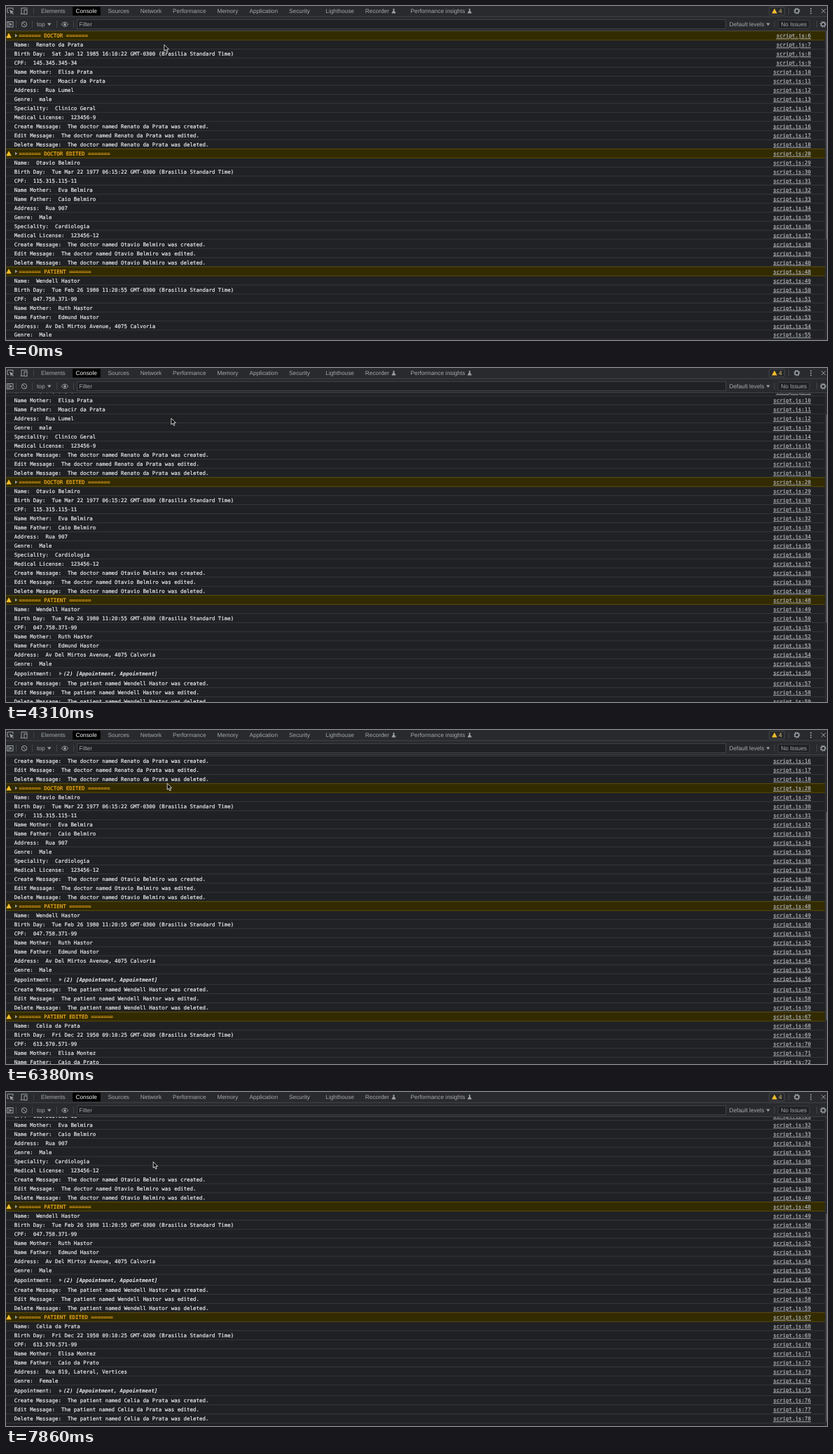
Write an HTML page that moves like this. It is 1172 px wide and 478 px high and loops after 8 s.

```html
<!DOCTYPE html>
<html lang="en">
<head>
<meta charset="utf-8">
<title>Console log</title>
<style>
  html, body { margin: 0; width: 100%; height: 100%; overflow: hidden; background: #202124; }
  svg { display: block; width: 100%; height: 100%; }
  text { white-space: pre; text-rendering: geometricPrecision; }
  #log text { font: 7.44px "DejaVu Sans Mono", monospace; fill: #eceef1; stroke: #eceef1; stroke-width: .18; }
  #log .warn { fill: #fdb322; stroke: #fdb322; }
  #log .link { fill: #b4b8bd; stroke: #b4b8bd; text-anchor: end; text-decoration: underline; }
  #log .list { font-weight: bold; font-style: italic; stroke: none; }
  .bar text { font: 8.3px "Liberation Sans", Arial, sans-serif; fill: #a4a9ae; }
  .bar .on { fill: #f1f3f4; }
  .sep { stroke: #4a4c50; stroke-width: .8; }
  .icon { fill: none; stroke: #9aa0a6; stroke-width: 1; }
  .solid { fill: #9aa0a6; }
</style>
</head>
<body>
<svg viewBox="0 0 1172 478" xmlns="http://www.w3.org/2000/svg">
  <defs>
    <clipPath id="view"><rect y="35.6" width="1172" height="442.4"/></clipPath>
    <path id="flask" d="M-1.3-3.2h2.6v.8h-.5V-.6L2.9 2.5Q3.1 3.3 2.3 3.3h-4.6q-.8 0-.6-.8L-.8-.6v-1.8h-.5z" fill="#9aa0a6"/>
    <path id="alert" d="M0-3.3 3.4 3H-3.4z" fill="#f7c02c" stroke="#f7c02c" stroke-width=".5" stroke-linejoin="round"/>
    <g id="gear" class="icon">
      <circle r="2.7" stroke-width="1.3"/>
      <circle r="3.9" stroke-width="1.3" stroke-dasharray="1.5 1.563"/>
    </g>
  </defs>

  <rect width="1172" height="478" fill="#202124"/>
  <g clip-path="url(#view)">
    <g id="log"></g>
    <rect x="1169" y="35" width="3" height="443" fill="#2a2b2e"/>
    <rect id="thumb" x="1170.5" y="36" width="2" height="298" fill="#56585c"/>
  </g>

  <g class="bar">
    <rect width="1172" height="35.6" fill="#292a2d"/>
    <rect x="95.2" y="1.2" width="39.6" height="12.4" fill="#000"/>
    <path class="sep" d="M0 15.2H1172M0 35.4H1172M39.5 3V12M1117.5 3V12M14.5 21V31M37.5 21V31M72.5 21V31M96.5 21V31M1097 21V31M1157.5 21V31"/>
    <g id="tabs"></g>

    <path class="icon" d="M4 9.5H2V3H10V6"/>
    <path class="solid" d="M5 5.5 11.2 8 8.8 8.9 11 11.2 10.1 12 8 9.8 7 12z"/>
    <path class="icon" d="M22 11V3H30V4.5M20.5 11.3H25"/>
    <rect class="icon" x="26" y="5.5" width="4" height="6.2"/>
    <use href="#flask" x="553.5" y="7.2"/>
    <use href="#flask" x="661.8" y="7.2"/>

    <rect x="1089.5" y="1.6" width="22" height="11.4" rx="1.5" fill="none" stroke="#4a4c50" stroke-width=".8"/>
    <use href="#alert" x="1097" y="7.3"/>
    <text x="1103" y="10.2" style="fill:#e3c36c">4</text>
    <use href="#gear" x="1129" y="7.2"/>
    <g class="solid"><circle cx="1149" cy="3.9" r="1"/><circle cx="1149" cy="7.2" r="1"/><circle cx="1149" cy="10.5" r="1"/></g>
    <path class="icon" d="M1164 4.2 1170 10.2M1170 4.2 1164 10.2"/>

    <rect class="icon" x="1.5" y="22.5" width="8.5" height="7.5"/>
    <path class="icon" d="M4 22.5V30"/>
    <path class="solid" d="M5.5 24 8.8 26.2 5.5 28.4z"/>
    <circle class="icon" cx="26" cy="26.2" r="3.7"/>
    <path class="icon" d="M23.4 23.6 28.6 28.8"/>
    <text x="44" y="29.1">top</text>
    <path class="solid" d="M59 24.6H64.6L61.8 28.2z"/>
    <path class="icon" d="M79.2 26.2Q84 20 88.8 26.2Q84 32.4 79.2 26.2z"/>
    <circle class="solid" cx="84" cy="26.2" r="1.7"/>
    <rect x="101.4" y="19.4" width="926" height="13.2" fill="#202124" stroke="#46494d" stroke-width=".8"/>
    <text x="104.5" y="29.1">Filter</text>
    <text x="1032.5" y="29.1">Default levels</text>
    <path class="solid" d="M1085.3 24.6H1090.5L1087.9 28.2z"/>
    <rect x="1102" y="20.3" width="45" height="11.8" rx="1.5" fill="#202124" stroke="#46494d" stroke-width=".8"/>
    <text x="1106.3" y="29.1">No Issues</text>
    <use href="#gear" x="1166.5" y="26.2"/>
  </g>

  <path id="cursor" d="M0 0V8.8L2 7 3.5 10.4 5 9.7 3.6 6.5H6.4z" fill="#000" stroke="#fff" stroke-width=".8" stroke-linejoin="round"/>
</svg>

<script>
const LOOP = 8000, STEP = 148;
const $ = id => document.getElementById(id);

function add(parent, tag, attrs, content) {
  const el = document.createElementNS("http://www.w3.org/2000/svg", tag);
  for (const name in attrs) el.setAttribute(name, attrs[name]);
  if (content) el.textContent = content;
  parent.appendChild(el);
}

const tabs = {
  Elements: 50, Console: 99.5, Sources: 145.5, Network: 191.8, Performance: 238,
  Memory: 301.5, Application: 347.5, Security: 404, Lighthouse: 456.3,
  Recorder: 512.8, "Performance insights": 577.5
};
for (const name in tabs)
  add($("tabs"), "text", { x: tabs[name], y: 10.1, class: name === "Console" ? "on" : "" }, name);

const log = $("log");
const heights = { warn: 13, field: 12.93, message: 13.12, list: 15.4 };
let rowTop = 35.8;

function row(kind, text, line) {
  const h = heights[kind], base = rowTop + 9.6;
  if (kind === "warn") {
    add(log, "rect", { y: rowTop, width: 1169, height: h, fill: "#332b00" });
    add(log, "path", { d: `M0 ${rowTop}H1169M0 ${rowTop + h}H1169`, stroke: "#665508", "stroke-width": .8 });
    add(log, "use", { href: "#alert", x: 4, y: rowTop + 6.6 });
    add(log, "path", { d: `M13 ${rowTop + 4.3}l3.4 2.3-3.4 2.3z`, fill: "#9aa0a6" });
    add(log, "text", { x: 18.5, y: base, class: "warn" }, text);
  } else {
    add(log, "path", { d: `M0 ${rowTop + h}H1169`, stroke: "#3b3d41", "stroke-width": .8 });
    if (kind === "list") {
      add(log, "text", { x: 11.8, y: base + 1.4 }, "Appointment:");
      add(log, "path", { d: `M76.2 ${rowTop + 5.9}l3.6 2.5-3.6 2.5z`, fill: "#9aa0a6" });
      add(log, "text", { x: 82, y: base + 1.4, class: "list" }, text);
    } else {
      add(log, "text", { x: 11.8, y: base }, text);
    }
  }
  add(log, "text", { x: 1149, y: base, class: "link" }, "script.js:" + line);
  rowTop += h;
}

function record(title, line, role, values) {
  const labels = ["Name", "Birth Day", "CPF", "Name Mother", "Name Father", "Address", "Genre", "Speciality", "Medical License"];
  row("warn", `======= ${title} =======`, line++);
  values.forEach((value, i) => {
    if (i === 1) value += " (Brasilia Standard Time)";
    row("field", `${labels[i]}:  ${value}`, line++);
  });
  if (role === "patient") row("list", "(2) [Appointment, Appointment]", line++);
  for (const verb of ["Create", "Edit", "Delete"]) {
    const past = verb.toLowerCase().replace(/e$/, "") + "ed";
    row("message", `${verb} Message:  The ${role} named ${values[0]} was ${past}.`, line++);
  }
}

record("DOCTOR", 6, "doctor", ["Renato da Prata", "Sat Jan 12 1985 16:10:22 GMT-0300", "145.345.345-34",
  "Elisa Prata", "Moacir da Prata", "Rua Lumel", "male", "Clinico Geral", "123456-9"]);
record("DOCTOR EDITED", 28, "doctor", ["Otavio Belmiro", "Tue Mar 22 1977 06:15:22 GMT-0300", "115.315.115-11",
  "Eva Belmira", "Caio Belmiro", "Rua 907", "Male", "Cardiologia", "123456-12"]);
record("PATIENT", 48, "patient", ["Wendell Hastor", "Tue Feb 26 1980 11:20:55 GMT-0300", "047.758.371-99",
  "Ruth Hastor", "Edmund Hastor", "Av Del Mirtos Avenue, 4075 Calvoria", "Male"]);
record("PATIENT EDITED", 67, "patient", ["Celia da Prata", "Fri Dec 22 1950 09:10:25 GMT-0200", "613.570.571-99",
  "Elisa Montez", "Caio da Prato", "Rua 819, Lateral, Vertices", "Female"]);

// Each move: start time, number of steps, then [scroll, cursor x, cursor y] at the first and last step.
const moves = [
  [0, 1, [0, 225.9, 55.4], [0, 225.9, 55.4]],
  [2540, 4, [0, 225.9, 55.4], [0, 230, 63.4]],
  [3420, 5, [6, 231, 65], [40, 235.9, 72]],
  [4310, 7, [47.8, 235.9, 72], [105.4, 235.9, 72]],
  [5950, 8, [119.8, 235.9, 72], [148, 216, 87.6]],
  [7120, 6, [151.8, 213.8, 89.4], [215.8, 210.2, 99.8]]
];

function pose(t) {
  const [start, steps, from, to] = moves.filter(m => m[0] <= t).pop();
  const k = Math.min(steps - 1, Math.floor((t - start) / STEP));
  const p = steps > 1 ? k / (steps - 1) : 0;
  return from.map((v, i) => v + (to[i] - v) * p);
}

function draw(now) {
  const [scroll, x, y] = pose(now % LOOP);
  log.setAttribute("transform", `translate(0 ${-scroll})`);
  $("thumb").setAttribute("y", 36 + scroll * .64);
  $("cursor").setAttribute("transform", `translate(${x} ${y})`);
  requestAnimationFrame(draw);
}
draw(performance.now());
</script>
</body>
</html>
```
